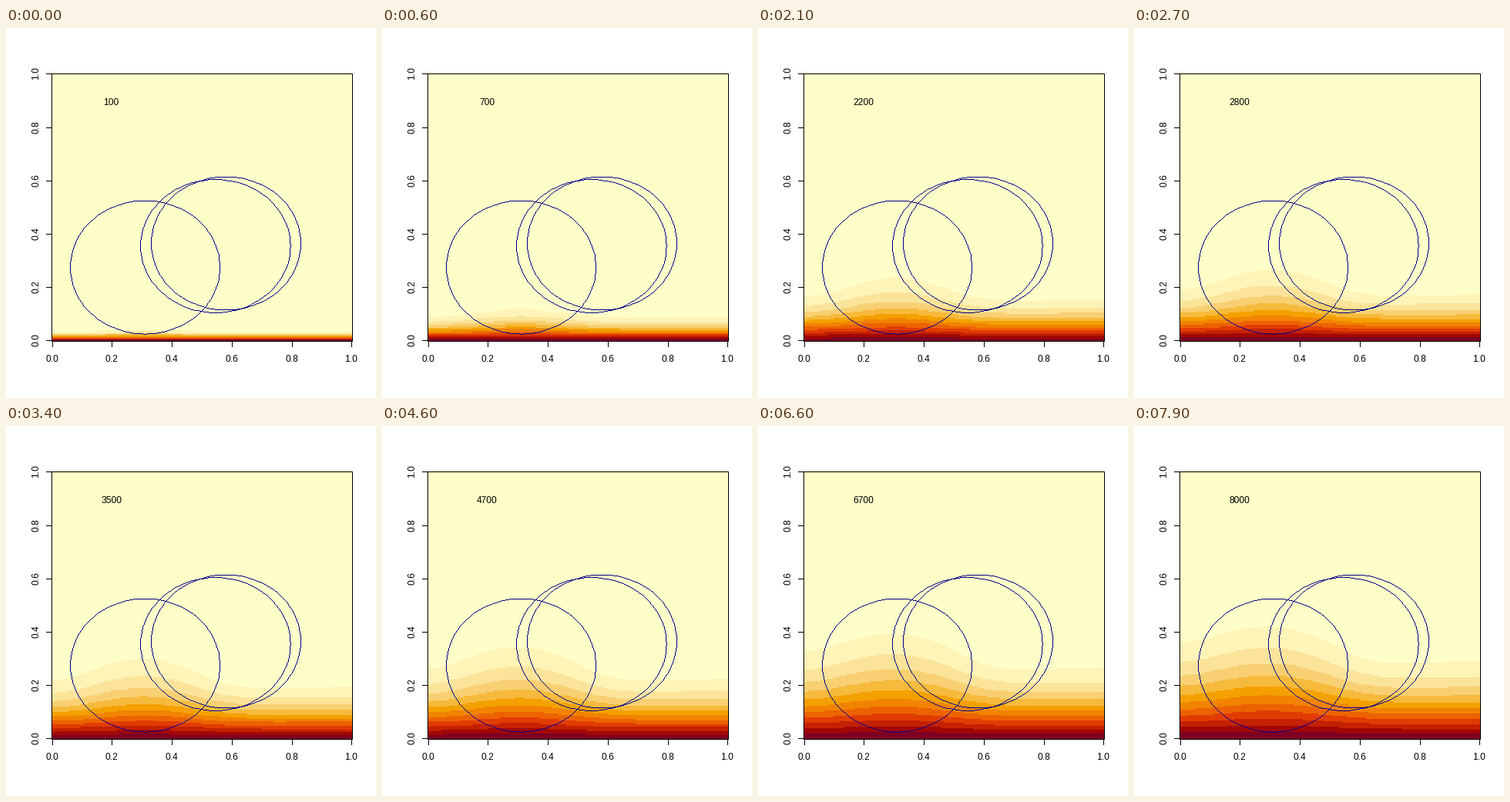
Animation, 480 px wide and 480 px high, one loop 8 s. Source, as a matplotlib script:

```python
import numpy as np
import matplotlib.pyplot as plt
from matplotlib.animation import FuncAnimation
from matplotlib.colors import ListedColormap, to_rgba

SIZE, DPI = 480, 100
PX = 72 / DPI                      # one pixel in points
N, FRAMES, STEPS = 200, 80, 100    # grid, frames, time units per frame
SUB = 2                            # solver steps per time unit
LEFT, RIGHT, TOP, BOTTOM = 59.04, 449.76, 59.04, 406.56
CELL_W, CELL_H = (RIGHT - LEFT) / N, (BOTTOM - TOP) / N
CENTRES = [(0.31, 0.275), (0.545, 0.355), (0.58, 0.365)]
BUMPS = [0.235, -0.02, -0.02]      # change of diffusivity at each centre
BASE, RADIUS = 0.069, 0.25
INK = "#00008B"


def to_px(x, y):
    """Data in 0..1 (cell centres) to whole stage pixels."""
    return (np.floor(LEFT + CELL_W * (0.5 + x * (N - 1))),
            np.floor(BOTTOM - CELL_H * (0.5 + y * (N - 1))))


def hcl_to_rgb(h, c, l):
    h = np.radians(h)
    y = ((l + 16) / 116) ** 3
    u = c * np.cos(h) / (13 * l) + 0.1978398
    v = c * np.sin(h) / (13 * l) + 0.4683363
    x = 9 * y * u / (4 * v)
    z = -x / 3 - 5 * y + 3 * y / v
    m = np.array([[3.240479, -1.537150, -0.498535],
                  [-0.969256, 1.875992, 0.041556],
                  [0.055648, -0.204043, 1.057311]])
    lin = np.clip(m @ np.array([x, y, z]), 0, 1)
    rgb = np.where(lin > 0.00304, 1.055 * lin ** (1 / 2.4) - 0.055, 12.92 * lin)
    return np.clip(rgb, 0, 1).T


def heat_palette(n):
    """Pale yellow to dark red, evenly stepped in HCL space."""
    i = np.linspace(0, 1, n)
    peak, k = 1 / (1 + 105 / 140), i ** 1.6
    chroma = np.where(k <= peak, 40 + 140 * k / peak,
                      180 - 105 * (k - peak) / (1 - peak))
    return hcl_to_rgb(85 - 80 * i, chroma, 99 - 74 * i ** 1.3)


def diffusivity():
    """Even ground with one smooth bump per circle."""
    g = np.linspace(0, 1, N)
    x, y = np.meshgrid(g, g)
    d = np.full((N, N), BASE)
    for (cx, cy), gain in zip(CENTRES, BUMPS):
        r2 = (x - cx) ** 2 + (y - cy) ** 2
        d += gain * np.exp(-2 * r2 / RADIUS ** 2)
    return d


def simulate():
    """Heat rising from a hot bottom edge, insulated at the sides."""
    d = diffusivity()[1:] / SUB
    u = np.zeros((N + 1, N + 2))
    u[0] = 1
    core = u[1:-1, 1:-1]
    lap = np.empty_like(core)
    shots = []
    for _ in range(FRAMES):
        for _ in range(STEPS * SUB):
            np.add(u[:-2, 1:-1], u[2:, 1:-1], out=lap)
            lap += u[1:-1, :-2]
            lap += u[1:-1, 2:]
            lap -= 4 * core
            lap *= d
            core += lap
            u[1:-1, 0] = u[1:-1, 1]
            u[1:-1, -1] = u[1:-1, -2]
        shots.append(np.clip((u[:N, 1:-1] * 12).astype(int), 0, 11))
    return shots


def circle_layer():
    """The circles as hard one-pixel polylines."""
    layer = np.zeros((SIZE, SIZE, 4))
    angle = np.linspace(0, 2 * np.pi, 101)
    for cx, cy in CENTRES:
        xs, ys = to_px(cx + RADIUS * np.cos(angle), cy + RADIUS * np.sin(angle))
        for xa, ya, xb, yb in zip(xs, ys, xs[1:], ys[1:]):
            n = int(max(abs(xb - xa), abs(yb - ya))) + 1
            cols = np.rint(np.linspace(xa, xb, n)).astype(int)
            rows = np.rint(np.linspace(ya, yb, n)).astype(int)
            layer[rows, cols] = to_rgba(INK)
    return layer


shots = simulate()

plt.rcParams["font.family"] = "Liberation Sans"
fig = plt.figure(figsize=(SIZE / DPI, SIZE / DPI), dpi=DPI, facecolor="white")
ax = fig.add_axes([0, 0, 1, 1])
ax.axis("off")

image = ax.imshow(shots[0], cmap=ListedColormap(heat_palette(12)), vmin=-0.5, vmax=11.5,
                  origin="lower", interpolation="nearest", aspect="auto",
                  extent=(LEFT - 0.5, RIGHT - 0.5, BOTTOM - 0.5, TOP - 0.5))
ax.imshow(circle_layer(), interpolation="nearest", aspect="auto",
          extent=(0, SIZE, SIZE, 0), zorder=1)
ax.set_xlim(0, SIZE)
ax.set_ylim(SIZE, 0)


def line(xs, ys):
    # whole coordinates snap to the centre of their pixel
    ax.plot(xs, ys, color="black", lw=PX, snap=True,
            solid_capstyle="projecting", solid_joinstyle="miter")


def label(x, y, s, **kw):
    return ax.text(x, y, s, fontsize=12 * PX, ha="center", va="baseline",
                   rotation_mode="anchor", **kw)


x0, x1, y0, y1 = 59, 449, 59, 406
line([x0, x1, x1, x0, x0], [y0, y0, y1, y1, y0])
for v in np.linspace(0, 1, 6):
    tx, ty = to_px(v, v)
    line([tx, tx], [y1, 413])
    line([52, x0], [ty, ty])
    label(tx - 0.5, 433, f"{v:.1f}")
    label(42.5, ty - 0.5, f"{v:.1f}", rotation=90)

counter = label(136.5, 100, "100")


def update(i):
    image.set_data(shots[i])
    counter.set_text(str((i + 1) * STEPS))
    return image, counter


anim = FuncAnimation(fig, update, frames=FRAMES, interval=100, repeat=True,
                     repeat_delay=0, blit=False)
plt.show()
```
